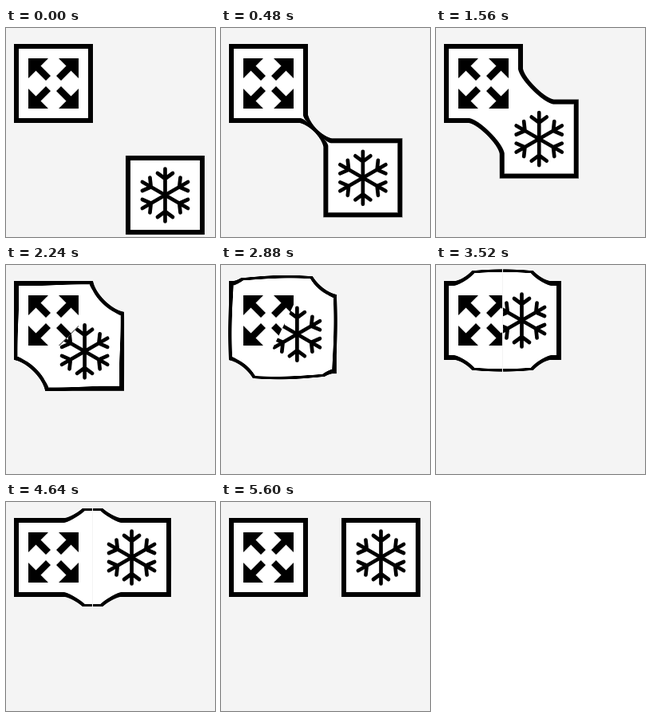
An HTML page with a canvas that plays this animation: 262 px wide and 262 px high, repeating every 5680 ms.

```html
<!DOCTYPE html>
<html lang="en">
<head>
<meta charset="utf-8">
<title>Merging boxes</title>
<style>
  html, body { margin: 0; height: 100%; overflow: hidden; background: #f4f4f4; }
  canvas { display: block; width: 100vw; height: 100vh; }
</style>
</head>
<body>
<canvas id="stage" width="262" height="262"></canvas>
<script>
const SIZE = 262, BG = 244, HALF = 49.5, BORDER = 6;
const REACH = 40, POWER = 1.4;
const LOOP = 5680, STEP = 40, LAST = 140;
const HOME = [59.5, 69.5];
// Offset of the moving box from the fixed one: [step, x, y]
const ROUTE = [[0, 140, 140], [62, 28.3, 28], [88, 48, 0], [LAST, 141, 0]];

const ctx = document.getElementById('stage').getContext('2d');
const image = ctx.createImageData(SIZE, SIZE);
const clamp = v => Math.max(0, Math.min(1, v));

function offsetAt(step) {
  const i = Math.max(1, ROUTE.findIndex(p => p[0] >= step));
  const [s0, x0, y0] = ROUTE[i - 1], [s1, x1, y1] = ROUTE[i];
  const k = (step - s0) / (s1 - s0);
  return [x0 + (x1 - x0) * k, y0 + (y1 - y0) * k];
}

// Pull of a square: 1 on its edge, fading to 0 at REACH outside
const strength = d => Math.max(0, 1 - d / REACH) ** POWER;

function pull(x, y) {
  const c = Math.max(Math.abs(x), Math.abs(y));
  return strength(c > HALF ? Math.hypot(x, y) * (1 - HALF / c) : c - HALF);
}

const INNER = strength(-BORDER), SLOPE = POWER / REACH;

function drawShape(bx, by) {
  const px = image.data;
  for (let y = 0, i = 0; y < SIZE; y++) {
    for (let x = 0; x < SIZE; x++, i += 4) {
      const cx = x + 0.5, cy = y + 0.5;
      const f = pull(cx - HOME[0], cy - HOME[1]) + pull(cx - bx, cy - by);
      const outer = clamp(0.5 + (f - 1) / SLOPE);
      const inner = clamp(0.5 + (f - INNER) / SLOPE);
      px[i] = px[i + 1] = px[i + 2] = BG * (1 - outer) + 255 * inner;
      px[i + 3] = 255;
    }
  }
  ctx.putImageData(image, 0, 0);
}

const arrow = new Path2D('M-31.5-31.5H-6.5L-16-22L-3.5-9.5L-9.5-3.5L-22-16L-31.5-6.5Z');
const spoke = new Path2D('M0 0V-33M-9.5-27.5L0-20.5L9.5-27.5');

function drawArrows() {
  for (const sx of [-1, 1]) for (const sy of [-1, 1]) {
    ctx.save();
    ctx.scale(sx, sy);
    ctx.fill(arrow);
    ctx.restore();
  }
}

function drawSnowflake() {
  ctx.lineWidth = 4.7;
  ctx.lineCap = ctx.lineJoin = 'round';
  for (let i = 0; i < 6; i++) {
    ctx.stroke(spoke);
    ctx.rotate(Math.PI / 3);
  }
}

// Each icon stays on its own side of the line midway between the boxes
function drawIcon(x, y, dx, dy, draw) {
  ctx.save();
  ctx.translate(x, y);
  const angle = Math.atan2(dy, dx);
  ctx.rotate(angle);
  ctx.beginPath();
  ctx.rect(-400, -400, 400 + Math.hypot(dx, dy) / 2, 800);
  ctx.clip();
  ctx.rotate(-angle);
  draw();
  ctx.restore();
}

function render(step) {
  const [dx, dy] = offsetAt(step);
  const x = HOME[0] + dx, y = HOME[1] + dy;
  drawShape(x, y);
  ctx.fillStyle = ctx.strokeStyle = '#000';
  drawIcon(...HOME, dx, dy, drawArrows);
  drawIcon(x, y, -dx, -dy, drawSnowflake);
  if (dy === 0) {
    ctx.fillStyle = `rgb(${BG},${BG},${BG})`;
    ctx.fillRect(Math.floor(HOME[0] + dx / 2), 0, 1, SIZE);
  }
}

const start = performance.now();
let shown = -1;
function tick() {
  const t = (performance.now() - start) % LOOP;
  const step = Math.min(LAST, Math.floor(t / STEP));
  if (step !== shown) render(shown = step);
  requestAnimationFrame(tick);
}
tick();
</script>
</body>
</html>
```
